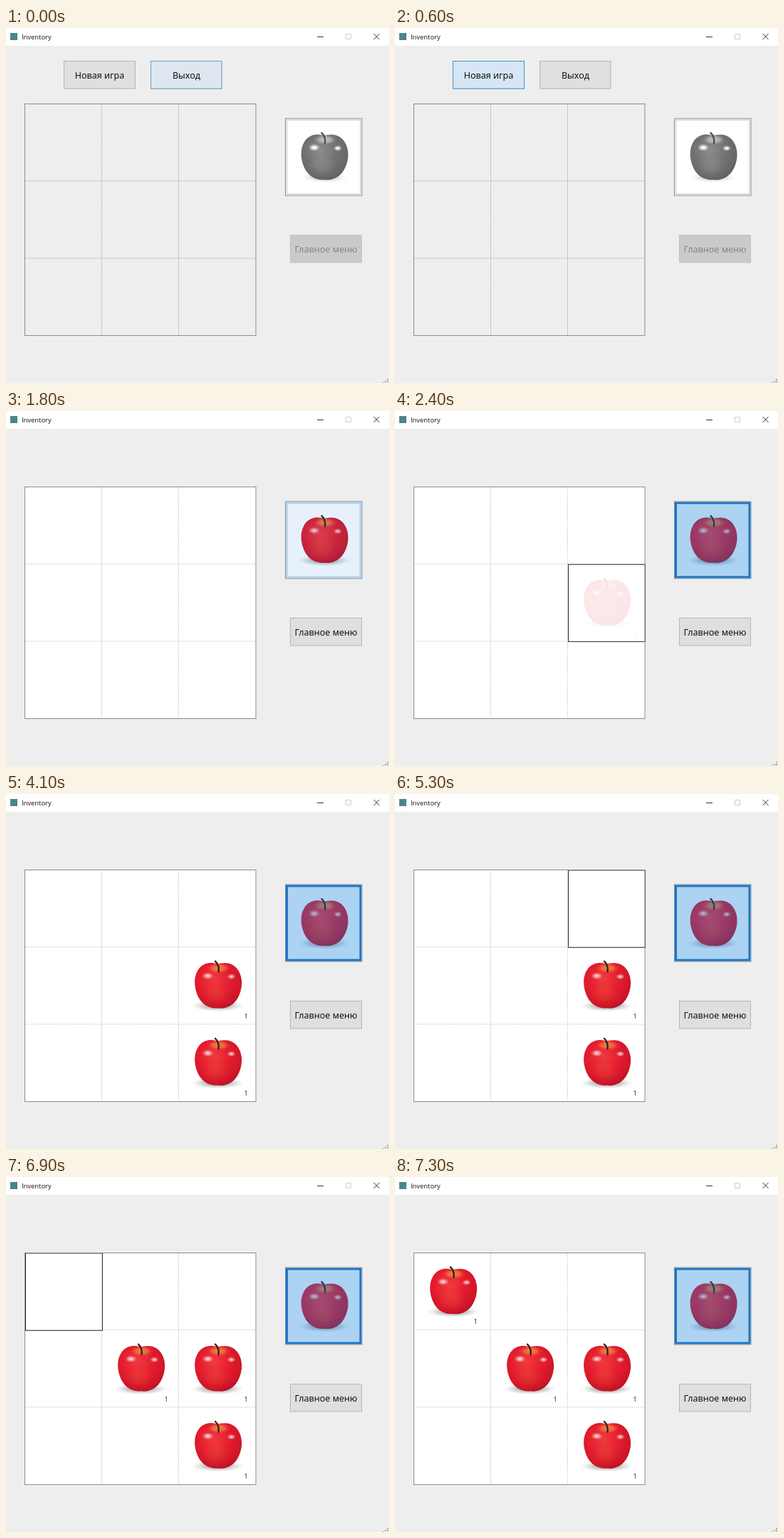
Animation, 538 px wide and 498 px high, one loop 8 s. Source, as an HTML page:

```html
<!DOCTYPE html>
<html lang="ru">
<head>
<meta charset="utf-8">
<title>Inventory</title>
<style>
  html, body { margin: 0; width: 100%; height: 100%; overflow: hidden; background: #eee; }
  svg { display: block; width: 538px; height: 498px; }
  text { font-family: "Noto Sans", "Open Sans", sans-serif; font-size: 12.5px; text-anchor: middle; fill: #111; }
  .title { font: 9.4px "Open Sans", "Noto Sans", sans-serif; text-anchor: start; }
  .count { font-size: 8px; }
  .button { fill: #dfdfdf; stroke: #b4b4b4; }
  .exit-hover { fill: #dfe6ef; stroke: #6ba5bf; }
  .new-hover { fill: #d6e6f4; stroke: #3f93bd; }
  .off .button { fill: #cacaca; stroke: #c2c2c2; }
  .off text { fill: #858585; }
  .off .gray { filter: grayscale(1) brightness(1.25); opacity: .85; }
  .off .sheet { fill: #eee; }
  .off .grid { stroke: #b4b4b4; }
  .sheet { fill: #fff; }
  .grid { stroke: #cdd2d2; stroke-dasharray: 1 .5; }
  .frame { fill: none; stroke: #8c8c8c; }
  .glyph { fill: none; stroke: #333; }
</style>
</head>
<body>
<svg viewBox="0 0 538 498">
  <defs>
    <radialGradient id="skin" cx=".42" cy=".36" r=".68">
      <stop offset="0" stop-color="#f23a3f"/>
      <stop offset=".5" stop-color="#e41c2e"/>
      <stop offset=".85" stop-color="#cf1628"/>
      <stop offset="1" stop-color="#b11425"/>
    </radialGradient>
    <radialGradient id="dip">
      <stop offset="0" stop-color="#e98a3c"/>
      <stop offset=".5" stop-color="#ee7a42" stop-opacity=".75"/>
      <stop offset="1" stop-color="#e8303a" stop-opacity="0"/>
    </radialGradient>
    <radialGradient id="shade">
      <stop offset="0" stop-color="#777"/>
      <stop offset=".6" stop-color="#aaa" stop-opacity=".5"/>
      <stop offset="1" stop-color="#ccc" stop-opacity="0"/>
    </radialGradient>
    <radialGradient id="shine">
      <stop offset="0" stop-color="#fff" stop-opacity=".9"/>
      <stop offset="1" stop-color="#fff" stop-opacity="0"/>
    </radialGradient>
    <g id="apple">
      <ellipse cx="55" cy="83" rx="37" ry="8" fill="url(#shade)"/>
      <path fill="url(#skin)" d="M54 25C46 20 33 23 27 33C20 44 22 61 29 73C36 84 47 87 55 86C65 88 77 83 83 72C90 60 91 43 83 32C76 22 64 21 54 25Z"/>
      <ellipse cx="56" cy="30" rx="17" ry="8" fill="url(#dip)"/>
      <ellipse cx="52" cy="66" rx="22" ry="17" fill="url(#dip)" opacity=".2"/>
      <ellipse cx="41" cy="41" rx="8" ry="5" fill="url(#shine)"/>
      <ellipse cx="74" cy="42" rx="6" ry="4" fill="url(#shine)"/>
      <path d="M56 35C57 29 55 24 51.500 20.500" fill="none" stroke="#38201c" stroke-width="2.400" stroke-linecap="round"/>
    </g>
  </defs>

  <rect width="538" height="498" fill="#eee"/>
  <rect width="538" height="25" fill="#fff"/>
  <rect x="6" y="7" width="10" height="10" fill="#4b8685"/>
  <text class="title" x="22" y="16">Inventory</text>
  <path class="glyph" d="M437 12.500h9M516.500 8l8 8m0-8l-8 8"/>
  <path class="glyph" d="M477.500 8.500h7v7h-7z" style="stroke:#ccc"/>
  <path d="M536 492v6M533 495v3M530 497v1" stroke="#aaa" stroke-width="2" stroke-dasharray="2 1"/>

  <g id="menu">
    <rect class="button" x="81.500" y="46.500" width="100" height="38.500"/>
    <rect class="new-hover" id="newHover" x="81.500" y="46.500" width="100" height="38.500"/>
    <text x="131.500" y="71">Новая игра</text>
    <rect class="button" x="203.500" y="46.500" width="99.500" height="38.500"/>
    <rect class="exit-hover" id="exitHover" x="203.500" y="46.500" width="99.500" height="38.500"/>
    <text x="253.500" y="71">Выход</text>
  </g>

  <g id="game">
    <rect class="sheet" x="26.500" y="106.500" width="324.500" height="325"/>
    <path class="grid" d="M134.500 107v324M242.500 107v324M27 214.500h324M27 323h324"/>
    <g id="items"></g>
    <rect id="marker" class="glyph" width="108" height="108.300"/>
    <rect class="frame" x="26.500" y="106.500" width="324.500" height="325"/>

    <rect x="392.500" y="127" width="107.500" height="108" fill="#fff"/>
    <use class="gray" href="#apple" x="392" y="126.700"/>
    <rect id="fade" x="394.500" y="129" width="103.500" height="104" fill="none" stroke="#ddd" stroke-width="2"/>
    <g id="selected">
      <rect x="393" y="127.500" width="106.500" height="107" fill="#0078d7" opacity=".32"/>
      <rect x="394.500" y="129" width="103.500" height="104" fill="none" stroke="#1877c9" stroke-width="3"/>
    </g>
    <rect class="frame" x="392.500" y="127" width="107.500" height="108"/>
    <rect class="button" x="399.500" y="290.500" width="100" height="38.500"/>
    <text x="449.500" y="315">Главное меню</text>
  </g>
</svg>
<script>
const LOOP = 8000, START = 700;
const $ = id => document.getElementById(id);

// Opacity steps: [time, value], each held until the next.
const fades = {
  exitHover: [[0, 1], [100, .65], [200, .25], [300, 0]],
  newHover: [[0, 0], [100, .25], [200, .6], [300, .85], [600, 1]],
  selected: [[0, 0], [1800, .3], [1900, .7], [2000, 1]]
};
const drops = [
  { col: 2, row: 1, steps: [[0, 0], [2400, .1], [2500, .8], [2600, 1]] },
  { col: 2, row: 2, steps: [[0, 0], [4000, .15], [4100, 1]] },
  { col: 1, row: 1, steps: [[0, 0], [5700, 1]] },
  { col: 0, row: 0, steps: [[0, 0], [7200, .15], [7300, 1]] }
];
// Cell under the dragged item, or null when nothing is dragged.
const marks = [
  [0, null], [2200, [2, 1]], [2500, null], [3600, [2, 2]], [4100, null],
  [5300, [2, 0]], [5400, [1, 0]], [5500, [1, 1]], [5700, null],
  [6700, [2, 0]], [6800, [1, 0]], [6900, [0, 0]], [7300, null]
];

const valueAt = (steps, t) => steps.findLast(([time]) => time <= t)[1];
const cellX = col => 26.5 + 108 * col;
const cellY = row => 106.5 + 108.3 * row;

function add(parent, tag, attrs) {
  const node = document.createElementNS("http://www.w3.org/2000/svg", tag);
  for (const key in attrs) node.setAttribute(key, attrs[key]);
  return parent.appendChild(node);
}

for (const drop of drops) {
  drop.node = add($("items"), "g", {});
  add(drop.node, "use", { href: "#apple", x: cellX(drop.col), y: cellY(drop.row) - .6 });
  add(drop.node, "text", {
    class: "count", x: 113 + 112 * drop.col, y: 206 + 108.5 * drop.row
  }).textContent = "1";
}

function render(t) {
  const playing = t >= START;
  $("menu").style.display = playing ? "none" : "";
  $("fade").style.display = playing ? "none" : "";
  $("game").classList.toggle("off", !playing);
  for (const id in fades) $(id).style.opacity = valueAt(fades[id], t);
  for (const drop of drops) drop.node.style.opacity = valueAt(drop.steps, t);

  const cell = valueAt(marks, t);
  $("marker").style.display = cell ? "" : "none";
  if (cell) {
    $("marker").setAttribute("x", cellX(cell[0]) + 1);
    $("marker").setAttribute("y", cellY(cell[1]) + .5);
  }
}

const begin = performance.now();
function tick() {
  render((performance.now() - begin) % LOOP);
  requestAnimationFrame(tick);
}
tick();
</script>
</body>
</html>
```
